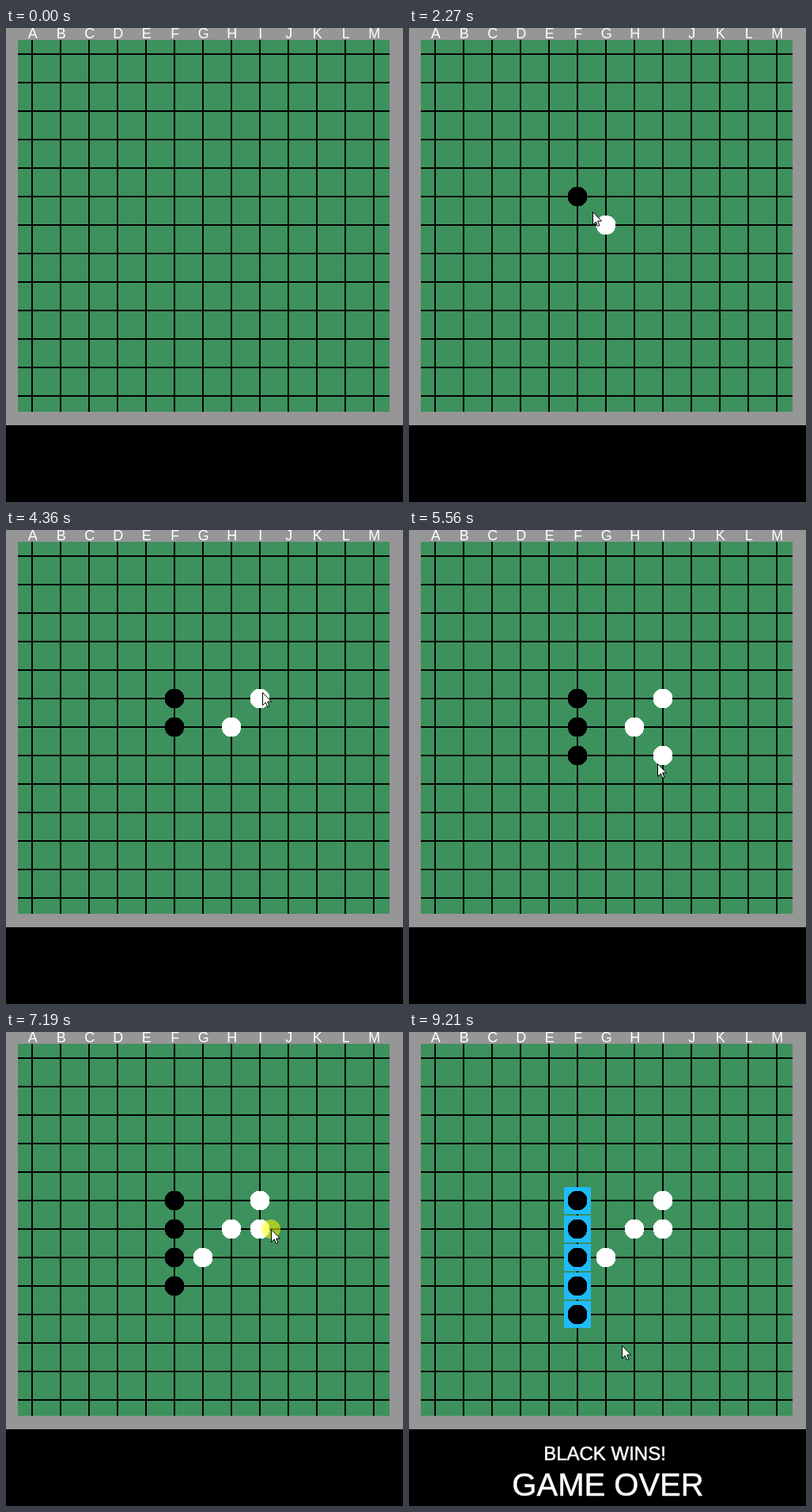
Write an HTML page that moves like this. It is 502 by 599 pixels and loops after 9260 ms.

```html
<!DOCTYPE html>
<html lang="en">
<head>
<meta charset="utf-8">
<title>Five in a row</title>
<style>
html, body { margin: 0; width: 100%; height: 100%; overflow: hidden; background: #000; }
svg { display: block; width: 100%; height: 100%; }
text { fill: #fff; text-anchor: middle; font-family: "Liberation Sans", Arial, sans-serif; }
#result { stroke: #fff; stroke-width: .5; }
#stones, #ghost { shape-rendering: crispEdges; }
</style>
</head>
<body>
<svg viewBox="0 0 502 599">
  <rect width="502" height="599"/>
  <rect width="502" height="502" fill="#969696"/>
  <rect x="15" y="15" width="470" height="470" fill="#3d915c"/>
  <g id="grid"></g>
  <g id="labels" font-size="18"></g>
  <g id="win" fill="#1fbbfa"></g>
  <g id="stones"></g>
  <circle id="ghost" r="12.4"/>
  <g id="result">
    <text x="247.5" y="540.5" font-size="24">BLACK WINS!</text>
    <text x="251.5" y="585.5" font-size="40">GAME OVER</text>
  </g>
  <circle id="press" r="12" fill="#ff0" fill-opacity=".53"/>
  <path id="pointer" d="M.5 .5V16.5L4.3 13L6.8 18.5L9 17.5L6.6 12H11.5Z" fill="#fff" stroke="#000"/>
</svg>
<script>
const LOOP = 9260, PRESS = 80, CELL = 36, EDGE = 33, RADIUS = 12.4;
const $ = id => document.getElementById(id);

// Pointer stops; a click comes shortly after arrival and is held before leaving
const via = (at, x, y) => ({ x, y, arrive: at, leave: at });
const click = (at, x, y) => ({ x, y, at, arrive: at - 130, leave: at + 90 });
const stops = [
  via(250, 358, 495), via(660, 180, 203), via(1070, 201, 204),
  via(1480, 211, 215), click(1910, 211, 215),
  via(2250, 231, 231.5), click(2600, 279, 243),
  click(3290, 217, 246),
  via(3670, 271, 274), click(4410, 324, 205),
  click(5030, 203, 285),
  via(5560, 314, 295), via(5620, 322, 305), click(5950, 263, 284),
  click(6450, 204, 316),
  via(6760, 249, 302), click(7190, 335, 249),
  click(8030, 214, 354),
  via(9120, 214, 354), via(9210, 269, 396)
];
const clicks = stops.filter(s => s.at);
const END = clicks[clicks.length - 1].at;

// Travel time grows with distance, limited by the time available
function pointerAt(t) {
  const i = stops.findIndex(s => s.arrive > t);
  if (i < 1) return stops[i < 0 ? stops.length - 1 : 0];
  const a = stops[i - 1], b = stops[i];
  const dx = b.x - a.x, dy = b.y - a.y;
  const span = Math.min(b.arrive - a.leave, 50 + 3.5 * Math.hypot(dx, dy));
  const u = Math.max(0, 1 - (b.arrive - t) / span), e = u * u * (3 - 2 * u);
  return { x: a.x + dx * e, y: a.y + dy * e };
}

const snap = v => EDGE + CELL * Math.max(0, Math.min(12, Math.round((v - EDGE) / CELL)));
const color = turn => turn % 2 ? "#fff" : "#000";
const show = (el, on) => el.setAttribute("visibility", on ? "visible" : "hidden");

function set(el, attrs) {
  for (const k in attrs) el.setAttribute(k, attrs[k]);
  return el;
}

function add(parent, tag, attrs) {
  const el = document.createElementNS("http://www.w3.org/2000/svg", tag);
  return $(parent).appendChild(set(el, attrs));
}

for (let i = 0; i < 13; i++) {
  const p = EDGE + CELL * i;
  add("grid", "rect", { x: p - 1, y: 15, width: 2, height: 470 });
  add("grid", "rect", { x: 15, y: p - 1, width: 470, height: 2 });
  add("labels", "text", { x: p + .7, y: 13 }).textContent = String.fromCharCode(65 + i);
}

const moves = clicks.map((c, turn) => {
  const x = snap(c.x), y = snap(c.y);
  if (turn % 2 === 0) add("win", "rect", { x: x - 17, y: y - 17, width: 34, height: 34 });
  return { at: c.at, x, y, el: add("stones", "circle", { cx: x, cy: y, r: RADIUS, fill: color(turn) }) };
});

function draw(t) {
  const p = pointerAt(t), x = snap(p.x), y = snap(p.y);
  const placed = moves.filter(m => m.at <= t);
  const over = t >= END, active = t >= stops[0].arrive;
  moves.forEach(m => show(m.el, m.at <= t));
  show($("win"), over);
  show($("result"), over);

  // Preview of the next stone on a free crossing
  const free = !placed.some(m => m.x === x && m.y === y);
  show($("ghost"), active && !over && free && p.y < 485);
  set($("ghost"), { cx: x, cy: y, fill: color(placed.length) });

  show($("press"), clicks.some(c => t >= c.at && t < c.at + PRESS));
  set($("press"), { cx: p.x, cy: p.y });
  show($("pointer"), active);
  set($("pointer"), { transform: `translate(${Math.round(p.x)} ${Math.round(p.y)})` });
}

const start = performance.now();
function tick() {
  draw((performance.now() - start) % LOOP);
  requestAnimationFrame(tick);
}
tick();
</script>
</body>
</html>
```
